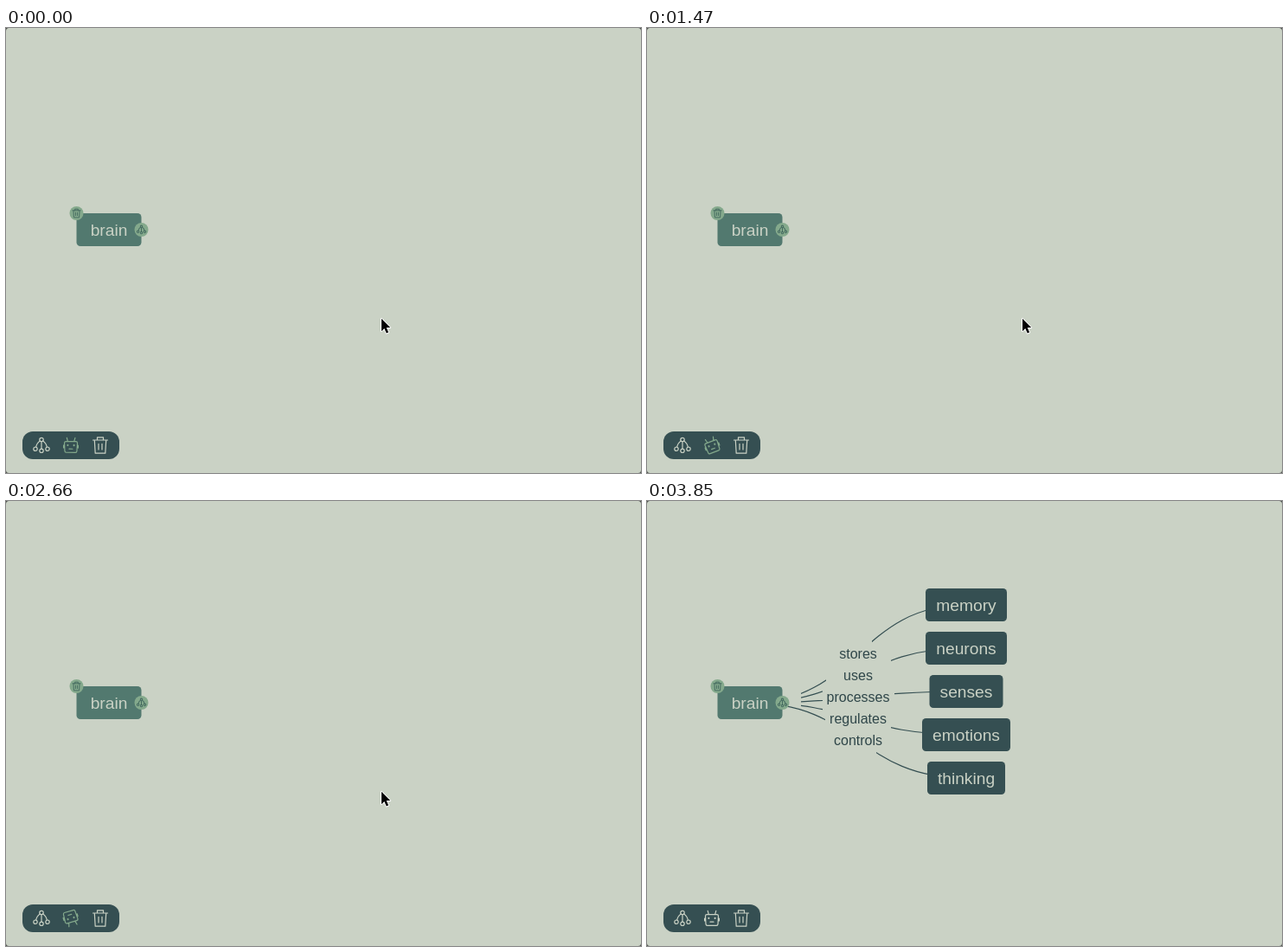
Animation of 734 by 514 pixels, one loop 4970 ms. Source, as an HTML page:

```html
<!DOCTYPE html>
<html lang="en">
<head>
<meta charset="utf-8">
<title>Mind map</title>
<style>
  html, body { margin: 0; width: 100%; height: 100%; overflow: hidden; background: #4b4f4b; }
  svg { display: block; }
  text { font-family: "Liberation Sans", Arial, sans-serif; text-anchor: middle; }
  .node { font-size: 19.2px; fill: #cad2c5; }
  .label { font-size: 16px; fill: #2f4649; }
  .icon { fill: none; stroke: currentColor; stroke-linecap: round; stroke-linejoin: round; }
</style>
</head>
<body>
<svg width="734" height="514" viewBox="0 0 734 514">
  <defs>
    <g id="share" class="icon">
      <circle cy="-6.5" r="2.2"/><circle cx="-7" cy="4.2" r="2.2"/>
      <circle cy="6.3" r="2.2"/><circle cx="7" cy="4.2" r="2.2"/>
      <path d="M0-4.3V4.1M-1.7-5Q-5.5-2.5-6.3 2M1.7-5Q5.5-2.5 6.3 2"/>
    </g>
    <g id="trash" class="icon">
      <path d="M-8.5-6H8.5M-3.5-6V-9.2H3.5V-6M-6.7-6L-5.8 9.2H5.8L6.7-6M-2-1.7V5M2-1.7V5"/>
    </g>
    <g id="robot" class="icon">
      <path d="M-7.5-2.6Q-7.5-4.4-5.7-4.4H5.7Q7.5-4.4 7.5-2.6L7 6.6Q6.9 8.3 5.3 8.3H-5.3Q-6.9 8.3-7 6.6ZM-3.7-4.6L-4.8-8.7M3.7-4.6L4.8-8.7M-8.4 0V3M8.4 0V3M-2 4.2H2"/>
      <path d="M-3.6-.3V.1M3.6-.3V.1" stroke-width="2"/>
    </g>
  </defs>

  <rect width="734" height="514" rx="3.5" fill="#cad2c5"/>
  <g id="map"></g>

  <rect x="81.5" y="214" width="75" height="38" rx="4.5" fill="#52796f"/>
  <text class="node" x="119" y="239.7">brain</text>
  <g fill="#84a98c"><circle cx="81.5" cy="214" r="8"/><circle cx="156.5" cy="233" r="8"/></g>
  <g color="#456b60" stroke-width="1.8">
    <use href="#trash" transform="translate(81.5 214) scale(.53)"/>
    <use href="#share" transform="translate(156.5 233) scale(.56)"/>
  </g>

  <rect x="19" y="466" width="112" height="32" rx="12" fill="#354f52"/>
  <g color="#cad2c5" stroke-width="1.2">
    <use href="#share" x="41" y="482"/>
    <use href="#trash" x="109" y="482"/>
    <use href="#robot" id="bot"/>
  </g>

  <path id="cursor" transform="translate(434 335.8)" d="M0 0V14.4L3.3 11.3 5.7 16.8 8.1 15.8 5.7 10.3H10.2Z"
        stroke="#fff" stroke-width="1.8" paint-order="stroke" stroke-linejoin="round"/>
</svg>
<script>
const LOOP = 4970, STEP = 70, TURN = 2100, LEAD = 10, ANSWER = 3290, CURSOR_OFF = 3850;
const [map, bot, cursor] = ["map", "bot", "cursor"].map(id => document.getElementById(id));

// relation, concept, box width, line start, gap from, gap to
const branches = [
  ["stores", "memory", 94, 178, 207, 260],
  ["uses", "neurons", 94, 178, 203, 282],
  ["processes", "senses", 85, 178, 203, 286],
  ["regulates", "emotions", 102, 178, 203, 282],
  ["controls", "thinking", 90, 157, 206, 265],
];

map.innerHTML = branches.map(([relation, concept, width, start, from, to], i) => {
  const y = 120 + 50 * i, mid = (233 + y) / 2;
  return `<clipPath id="gap${i}"><path d="M${start} 90H${from}V350H${start}ZM${to} 90H369V350H${to}Z"/></clipPath>
    <path d="M119 233C244 233 244 ${y} 369 ${y}" clip-path="url(#gap${i})" fill="none" stroke="#354f52" stroke-width="1.2"/>
    <rect x="${369 - width / 2}" y="${y - 19}" width="${width}" height="38" rx="4.5" fill="#354f52"/>
    <text class="node" x="369" y="${y + 6.7}">${concept}</text>
    <text class="label" x="244" y="${mid + 5.7}">${relation}</text>`;
}).join("");

// cubic-bezier(.25, .1, .25, 1)
function ease(x) {
  let lo = 0, hi = 1, t;
  for (let i = 0; i < 20; i++) {
    t = (lo + hi) / 2;
    if (.75 * t * (1 - t) + t ** 3 < x) lo = t; else hi = t;
  }
  return .3 * t * (1 - t) ** 2 + 3 * t * t * (1 - t) + t ** 3;
}

function draw(now) {
  const time = Math.floor((now % LOOP) / STEP) * STEP;
  const answered = time >= ANSWER;
  const angle = answered ? 0 : 360 * ease(((time + LEAD) % TURN) / TURN);
  bot.setAttribute("transform", `translate(75 482) rotate(${angle})`);
  bot.setAttribute("color", answered ? "#cad2c5" : "#84a98c");
  map.style.display = answered ? "" : "none";
  cursor.style.display = time < CURSOR_OFF ? "" : "none";
  requestAnimationFrame(draw);
}
draw(0);
</script>
</body>
</html>
```
